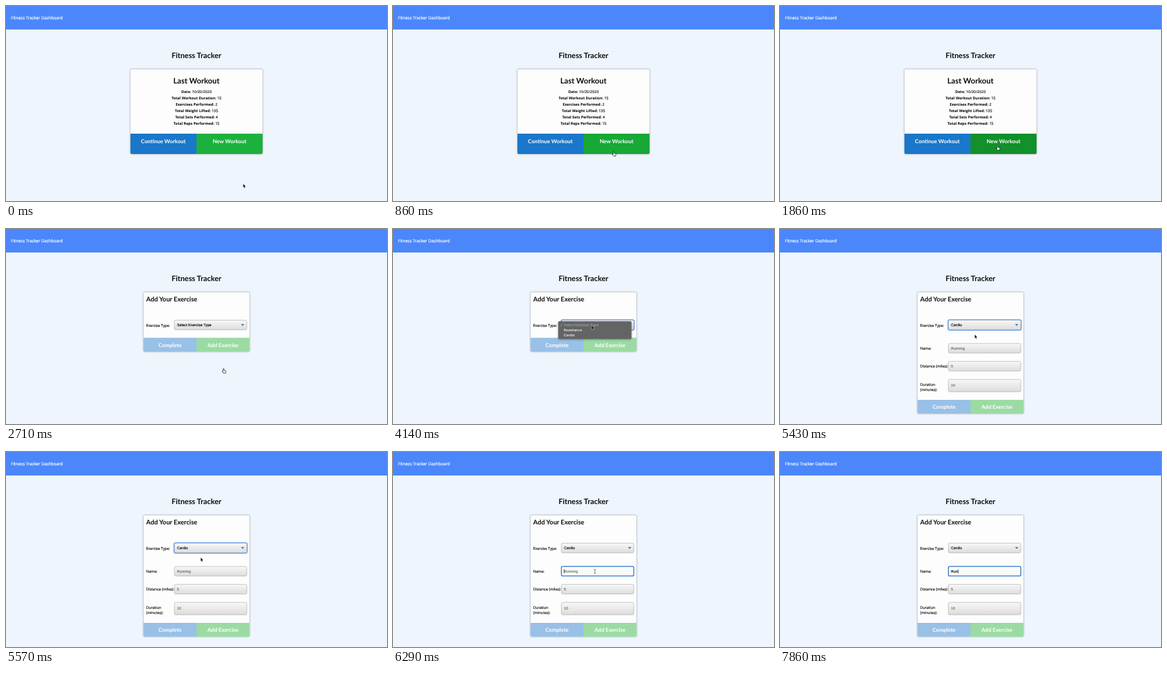
An HTML page that plays this animation: 600x307 px, repeating every 8 s.

```html
<!DOCTYPE html>
<html lang="en">
<head>
<meta charset="utf-8">
<title>Fitness Tracker</title>
<style>
html, body { margin: 0; width: 100%; height: 100%; overflow: hidden; background: #eef5fd; }
svg { display: block; width: 100vw; height: 100vh; text-rendering: geometricPrecision; }
text { font: 5.77px "Open Sans", sans-serif; fill: #000; stroke: #000; stroke-width: .13; }
.lato { font-family: Lato, sans-serif; font-weight: 700; fill: #0c0c0c; stroke: none; }
.mid { text-anchor: middle; }
.stat { font-size: 5.85px; }
.b { font-weight: 700; stroke: none; }
.btn { font-size: 8.5px; fill: #fff; }
.nav { font-size: 6.64px; fill: #fff; stroke: #fff; stroke-width: .2; }
.field { font: 5.83px "Liberation Sans", Arial, sans-serif; }
.hint { fill: #666; stroke: #666; }
.item { font: 500 5.5px Inter, sans-serif; fill: #fff; stroke: none; }
.box { fill: url(#grey); stroke: #a0a0a0; stroke-width: .6; }
.card { fill: #fdfdfd; stroke: #ccd0d5; stroke-width: .5; filter: drop-shadow(0 .5px 1px #0005); }
</style>
</head>
<body>
<svg viewBox="0 0 600 307" preserveAspectRatio="none">
  <defs>
    <linearGradient id="grey" x2="0" y2="1">
      <stop stop-color="#f8f8f8"/><stop offset="1" stop-color="#dcdcdc"/>
    </linearGradient>
  </defs>
  <rect width="600" height="307" fill="#eef5fd"/>
  <rect width="600" height="37" fill="#4b87fb"/>
  <text class="nav" x="8" y="21.2">Fitness Tracker Dashboard</text>
  <text class="lato mid" x="299.9" y="82.4" style="font-size:11.8px">Fitness Tracker</text>

  <g id="summary">
    <rect class="card" x="196" y="99.5" width="208" height="133.5" rx="2"/>
    <text class="lato mid" x="299.9" y="122.2" style="font-size:12.05px">Last Workout</text>
    <g id="stats"></g>
    <path d="M196 201.1h104v31.9h-102q-2 0-2-2z" fill="#1a77c9"/>
    <path id="newBtn" d="M300 201.1h104v29.9q0 2-2 2h-102z"/>
    <text class="lato mid btn" x="247.8" y="215.6">Continue Workout</text>
    <text class="lato mid btn" x="352" y="215.6">New Workout</text>
  </g>

  <g id="form">
    <rect class="card" id="panel" x="216.5" y="99.5" width="167" rx="2"/>
    <text class="lato" x="220.8" y="114" style="font-size:10.1px">Add Your Exercise</text>
    <text x="220.8" y="153.6">Exercise Type:</text>
    <rect id="ring" x="264.8" y="143.2" width="114.8" height="15.8" rx="2.4" fill="none" stroke="#5598f6" stroke-width="1.9"/>
    <rect class="box" x="265.2" y="143.5" width="114" height="15.2" rx="2"/>
    <text class="field" id="choice" x="269.3" y="153.2"></text>
    <path d="M370.1 149.7h5.2l-2.6 2.9z" fill="#1a6fc4"/>

    <g id="extra">
      <text x="220.8" y="190">Name:</text>
      <text x="220.8" y="218.4">Distance (miles):</text>
      <text x="220.8" y="247">Duration</text>
      <text x="220.8" y="255">(minutes):</text>
      <rect class="box" id="nameBox" x="265.2" y="180.2" width="114" height="15" rx="2"/>
      <rect class="box" x="265.2" y="208.4" width="114" height="15.2" rx="2"/>
      <rect class="box" x="265.2" y="236.8" width="114" height="19.4" rx="2"/>
      <text class="field" id="name" x="269.3" y="189.8"></text>
      <rect id="caret" y="184.4" width=".6" height="6.6"/>
      <text class="field hint" x="269.3" y="218.2">5</text>
      <text class="field hint" x="269.3" y="248.4">10</text>
    </g>

    <g id="foot">
      <path d="M216.5 171.2h83.5v21.8h-81.5q-2 0-2-2z" fill="#99c0e6"/>
      <path d="M300 171.2h83.5v19.8q0 2-2 2h-81.5z" fill="#9bdba3"/>
      <text class="lato mid btn" x="258.3" y="185.6">Complete</text>
      <text class="lato mid btn" x="341.7" y="185.6">Add Exercise</text>
    </g>

    <g id="menu">
      <rect x="260.2" y="145.3" width="115.3" height="27.6" rx="1.6" fill="#636464" style="filter:drop-shadow(0 1px 1.5px #0006)"/>
      <rect id="row" x="260.2" width="115.3" height="8" fill="#3d7df2"/>
      <path d="M263.2 151.4l1.1 1.5 2-3.6" fill="none" stroke="#a8a8a8" stroke-width=".6"/>
      <text class="item" x="269" y="153.2" style="fill:#a8a8a8">Select Exercise Type</text>
      <text class="item" x="269" y="161.1">Resistance</text>
      <text class="item" x="269" y="169.1">Cardio</text>
    </g>
  </g>

  <g id="pointer">
    <path id="arrow" d="M0 0v6.2l1.4-1.2 1 2.2 1-.4-1-2.2h1.9z" stroke="#fff" stroke-width=".4"/>
    <path id="hand" d="M-.8 0q0-.8.7-.8t.7.8v2l2.3.6q.8.2.7 1.2l-.6 2.8h-3.2l-2.2-2.8q.3-.9 1.6.1z" fill="#fff" stroke="#000" stroke-width=".7"/>
    <path id="beam" d="M-1.2-3.4q1.2 0 1.2.8q0-.8 1.2-.8M0-2.6v5.2M-1.2 3.4q1.2 0 1.2-.8q0 .8 1.2 .8" fill="none" stroke="#222" stroke-width=".6"/>
  </g>
</svg>
<script>
const LOOP = 8000, FPS = 7;
const $ = id => document.getElementById(id);
const show = (id, on) => $(id).style.display = on ? '' : 'none';
const set = (id, attrs) => { for (const a in attrs) $(id).setAttribute(a, attrs[a]); };

$('stats').innerHTML = [
  ['Date', '10/20/2020'], ['Total Workout Duration', 15], ['Exercises Performed', 2],
  ['Total Weight Lifted', 135], ['Total Sets Performed', 4], ['Total Reps Performed', 15]
].map(([label, value], i) =>
  `<text class="mid stat" x="300" y="${137.2 + i * 10}"><tspan class="b">${label}</tspan>: ${value}</text>`).join('');

// Pointer legs: start tick, end tick, target
const legs = [[0, 8, 342.7, 220.4], [21, 28, 312.6, 152], [29, 34, 306.6, 164], [36, 38, 306.6, 166], [39, 44, 318, 188]];

function pointerAt(k) {
  let x = 373.5, y = 279.8;
  for (const [from, to, tx, ty] of legs) {
    const u = Math.min(1, Math.max(0, (k - from) / (to - from)));
    const e = u * u * (3 - 2 * u);
    x += (tx - x) * e;
    y += (ty - y) * e;
  }
  return [x, y];
}

function draw(t) {
  const k = Math.floor((t + 5) * FPS / 1000);
  const [x, y] = pointerAt(k);
  const onForm = k >= 19, open = k >= 28 && k < 37, chosen = k >= 37, full = k >= 38, typing = k >= 44;

  show('summary', !onForm);
  show('form', onForm);
  const over = !onForm && y < 233;
  set('newBtn', { fill: k >= 15 ? '#119f2f' : k === 14 ? '#11972c' : k === 13 ? '#12902a' : over ? '#17a836' : '#1cb13d' });

  set('panel', { height: full ? 191.2 : 93.5 });
  set('foot', { transform: `translate(0 ${full ? 97.7 : 0})` });
  show('extra', full);
  show('ring', k >= 28 && !typing);
  $('choice').textContent = chosen ? 'Cardio' : 'Select Exercise Type';
  show('menu', open);
  show('row', y > 155.2);
  set('row', { y: y > 163 ? 163.2 : 155.2 });

  const word = 'Run'.slice(0, k >= 55 ? 3 : k >= 53 ? 2 : k >= 50 ? 1 : 0);
  const name = $('name');
  name.textContent = word || 'Running';
  name.classList.toggle('hint', !word);
  $('nameBox').style.cssText = typing ? 'fill:#fafafa;stroke:#2370c8;stroke-width:1.3' : '';
  show('caret', typing && k !== 48 && k !== 49);
  set('caret', { x: 269.3 + (word ? name.getComputedTextLength() : 0) });

  const hand = over || (onForm && k < 22);
  const beam = k >= 43;
  show('pointer', k < 51);
  show('hand', hand);
  show('beam', beam);
  show('arrow', !hand && !beam);
  set('pointer', { transform: `translate(${x} ${y})` });
}

const start = performance.now();
function tick() {
  draw((performance.now() - start) % LOOP);
  requestAnimationFrame(tick);
}
tick();
</script>
</body>
</html>
```
